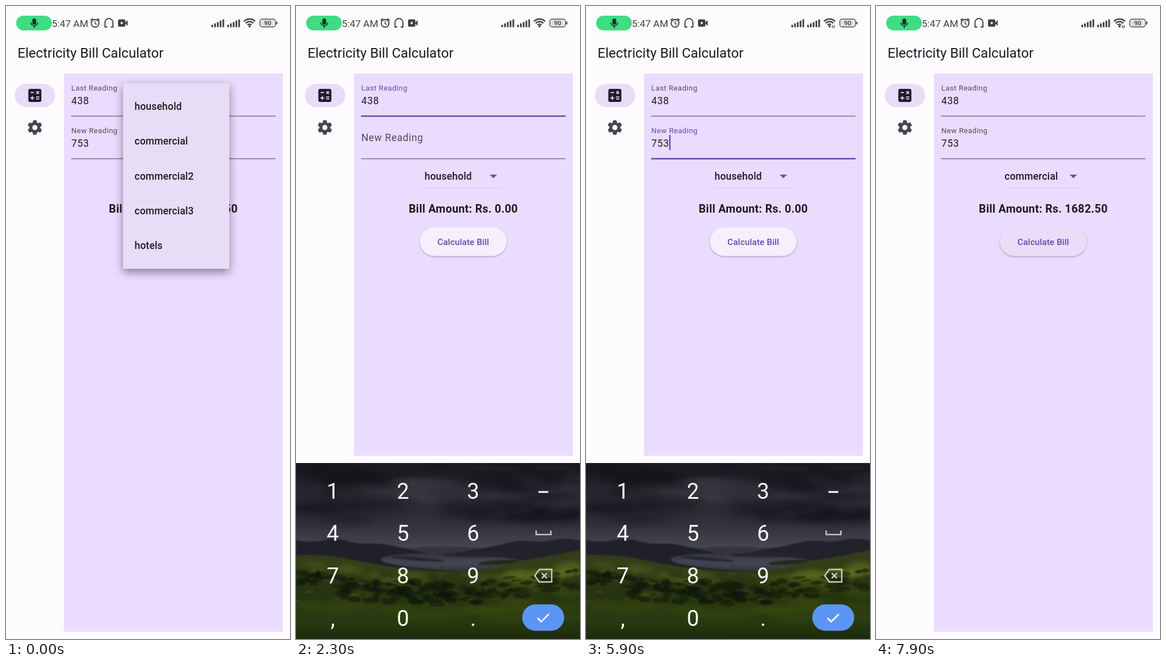
An HTML page with a canvas that plays this animation: 502x1115 px, repeating every 8000 ms.

```html
<!DOCTYPE html>
<html lang="en">
<head>
<meta charset="utf-8">
<title>Electricity Bill Calculator</title>
<style>
html, body { margin: 0; width: 100%; height: 100%; overflow: hidden; background: #fefbff; }
canvas { display: block; }
</style>
</head>
<body>
<canvas id="stage" width="502" height="1115"></canvas>
<script>
const LOOP = 8000, W = 502, H = 1115, KEYBOARD = 310;
const INK = '#1c1a20', SOFT = '#504a58', PRIMARY = '#6646ae', PANEL = '#eadcfe', STATUS = '#414144';
const c = document.getElementById('stage').getContext('2d');

const clamp = x => Math.max(0, Math.min(1, x));
const span = (t, from, to) => clamp((t - from) / (to - from));
const easeOut = p => 1 - (1 - p) ** 3;
const within = (t, from, to) => t >= from && t < to;

// Timeline
const FOCUS_LAST = 350, FOCUS_NEW = 3080, BLUR = 6150, PICKED = 6855, CALCULATED = 7480;
const presses = [['4', 1150], ['3', 1450], ['8', 1760], ['7', 3880], ['5', 4380], ['3', 4850]]
  .map(([key, release]) => ({ key, release }));
const taps = [[200, 166, 230, 370], [200, 232, 2960, 3100], [437, 1078, 6020, 6160],
  [290, 300, 6460, 6590], [246, 360, 6760, 6930], [296, 415, 7360, 7500]];
const ITEMS = ['household', 'commercial', 'commercial2', 'commercial3', 'hotels'];
const KEYS = ['123', '456', '789', ',0.'];
const keyX = col => 65 + col * 124, keyY = row => 49 + row * 74.7;

// Drawing helpers
function text(s, x, y, size, color = INK, { weight = 400, spacing = 0, align = 'left' } = {}) {
  c.font = `${weight} ${size}px Roboto, sans-serif`;
  c.letterSpacing = spacing + 'px';
  c.textAlign = align;
  c.fillStyle = color;
  c.fillText(s, x, y);
}
function box(x, y, w, h, r, color) {
  c.beginPath();
  c.roundRect(x, y, w, h, r);
  c.fillStyle = color;
  c.fill();
}
function disc(x, y, r, color) {
  c.beginPath();
  c.arc(x, y, r, 0, 7);
  c.fillStyle = color;
  c.fill();
}
function line(points, color, width, closed = false) {
  c.beginPath();
  points.forEach(([x, y]) => c.lineTo(x, y));
  if (closed) c.closePath();
  c.strokeStyle = color;
  c.lineWidth = width;
  c.stroke();
}
function arc(x, y, r, from, to, color, width) {
  c.beginPath();
  c.arc(x, y, r, from * Math.PI, to * Math.PI);
  c.strokeStyle = color;
  c.lineWidth = width;
  c.stroke();
}
function shadow(color, blur, dy) {
  c.shadowColor = color;
  c.shadowBlur = blur;
  c.shadowOffsetY = dy;
}

// Stormy landscape behind the keys, painted once
function paintLandscape() {
  const canvas = document.createElement('canvas');
  canvas.width = W;
  canvas.height = KEYBOARD;
  const g = canvas.getContext('2d');
  const gradient = (y0, y1, ...colors) => {
    const fill = g.createLinearGradient(0, y0, 0, y1);
    colors.forEach((color, i) => fill.addColorStop(i / (colors.length - 1), color));
    return fill;
  };
  let seed = 7;
  const random = () => (seed = seed * 16807 % 2147483647) / 2147483647;
  const oval = (x, y, w, h, color, tilt = 0) => {
    g.beginPath();
    g.ellipse(x, y, w, h, tilt, 0, 7);
    g.fillStyle = color;
    g.fill();
  };
  // Ground below a smooth skyline
  const land = (skyline, fill) => {
    g.beginPath();
    g.moveTo(skyline[0][0], KEYBOARD);
    g.lineTo(...skyline[0]);
    for (let i = 1; i < skyline.length - 1; i++) {
      const [x, y] = skyline[i], [nx, ny] = skyline[i + 1];
      g.quadraticCurveTo(x, y, (x + nx) / 2, (y + ny) / 2);
    }
    g.lineTo(...skyline.at(-1));
    g.lineTo(skyline.at(-1)[0], KEYBOARD);
    g.fillStyle = fill;
    g.fill();
  };
  // Irregular patches scattered in a band that may slope
  const scatter = (n, x0, x1, y0, y1, slope, w, h, color) => {
    for (let i = 0; i < n; i++) {
      const x = x0 + random() * (x1 - x0), y = y0 + random() * (y1 - y0) + (x - x0) * slope;
      oval(x, y, w * (.3 + random()), h * (.4 + random()), color, slope);
    }
  };

  g.fillStyle = gradient(0, 150, '#1d1d23', '#26252c', '#2b2a33', '#34323c', '#494752');
  g.fillRect(0, 0, W, KEYBOARD);
  g.filter = 'blur(10px)';
  oval(230, 50, 130, 14, 'rgba(82,79,88,.5)', .1);
  oval(90, 22, 110, 14, 'rgba(12,12,16,.6)', .1);
  oval(400, 20, 120, 12, 'rgba(14,14,18,.5)', -.1);
  oval(390, 84, 140, 17, 'rgba(18,18,24,.6)', .06);
  oval(90, 80, 110, 14, 'rgba(18,18,24,.5)', -.06);
  g.filter = 'blur(5px)';
  scatter(24, 0, W, 5, 100, 0, 50, 5, 'rgba(82,80,92,.2)');
  scatter(24, 0, W, 0, 105, 0, 55, 6, 'rgba(12,12,18,.28)');

  g.filter = 'blur(.8px)';
  land([[0, 150], [180, 152], [250, 146], [340, 151], [W, 145]], '#353541');
  land([[250, 166], [300, 155], [350, 147], [395, 135], [435, 140], [470, 132], [W, 136]], '#22222d');
  land([[0, 136], [25, 141], [70, 131], [110, 143], [150, 141], [200, 152], [250, 164]], '#20202b');
  oval(285, 175, 135, 15, gradient(160, 190, '#34353f', '#454653', '#33353d'), .04);
  oval(325, 162, 70, 3.5, '#24252d');
  oval(215, 169, 48, 3, '#25272d', .08);
  oval(360, 175, 38, 4, '#25281f', -.06);
  land([[0, 162], [50, 161], [115, 173], [170, 184], [240, 191], [310, 191], [355, 183],
    [410, 170], [455, 163], [W, 153]],
    gradient(155, KEYBOARD, '#343b1c', '#343f17', '#2a3613', '#25330f', '#2b3c10', '#26380f', '#1b2a0b'));
  g.filter = 'blur(4px)';
  scatter(16, 0, 210, 174, 193, .1, 30, 4, 'rgba(100,112,40,.38)');
  scatter(16, 320, W, 203, 222, -.16, 32, 5, 'rgba(104,118,38,.4)');
  scatter(14, 100, W, 200, 250, 0, 40, 5, 'rgba(84,102,28,.3)');
  scatter(12, 0, W, 248, 275, 0, 65, 6, 'rgba(66,88,20,.3)');
  g.filter = 'blur(1px)';
  scatter(75, 0, 310, 188, 215, .09, 12, 4, 'rgba(17,22,11,.55)');
  scatter(45, 70, 330, 216, 240, .05, 12, 4, 'rgba(15,21,9,.55)');
  scatter(45, 330, W, 205, 242, -.1, 11, 3.5, 'rgba(18,24,10,.55)');
  scatter(60, 0, W, 178, 245, 0, 7, 1.5, 'rgba(112,122,48,.22)');
  g.filter = 'none';
  return canvas;
}
const landscape = paintLandscape();

function statusBar(t) {
  box(18, 17, 63, 26, 13, '#3fdc84');
  box(46.5, 22, 7, 11, 3.5, '#173322');
  arc(50, 29, 6, 0, 1, '#173322', 1.6);
  line([[50, 35], [50, 38.5]], '#173322', 2);
  text('5:47 AM', 81, 37, 17.4, STATUS);

  arc(157.5, 30.5, 6.8, 0, 2, STATUS, 1.9);
  line([[157.5, 26.5], [157.5, 31], [160.5, 32.5]], STATUS, 1.5);
  line([[149.5, 25.5], [153.5, 22]], STATUS, 2);
  line([[161.5, 22], [165.5, 25.5]], STATUS, 2);
  arc(182, 29, 7, 1, 2, STATUS, 1.9);
  line([[175, 29], [175, 37], [179, 37]], STATUS, 1.9);
  line([[189, 29], [189, 37], [185, 37]], STATUS, 1.9);
  box(198, 23.5, 13, 13, 2.5, STATUS);
  c.beginPath();
  [[210, 30], [215, 25], [215, 35]].forEach(p => c.lineTo(...p));
  c.fill();
  disc(204.5, 30, 2, '#fefbff');

  for (const x of [363, 391])
    for (let i = 0; i < 5; i++) box(x + i * 4.9, 33 - i * 2.4, 3, 4.5 + i * 2.4, 1, STATUS);
  for (const r of [5, 9.5, 14]) arc(430.5, 37, r, 1.25, 1.75, STATUS, 2.5);
  disc(430.5, 35.8, 2, STATUS);
  if (t >= 2900) {
    box(433, 32, 9, 8, 0, '#fefbff');
    line([[435.5, 39], [435.5, 34]], STATUS, 1.4);
    line([[438.5, 34], [438.5, 39]], STATUS, 1.4);
  }
  c.beginPath();
  c.roundRect(448.7, 23.2, 27.5, 13.6, 4);
  c.strokeStyle = STATUS;
  c.lineWidth = 1.4;
  c.stroke();
  box(450.5, 25, 22, 10, 2.5, '#dedce0');
  box(477.5, 27.5, 2.2, 5, 1, STATUS);
  text('90', 462.5, 34, 11, STATUS, { weight: 500, align: 'center' });
}

function rail() {
  box(15.5, 137, 71.5, 41, 20.5, '#e7ddf6');
  box(39.5, 146, 23, 23, 3, '#1f192c');
  const mark = '#e7ddf6';
  line([[43.5, 152.5], [49.5, 152.5]], mark, 1.8);
  line([[53.7, 150.2], [58.3, 154.8]], mark, 1.7);
  line([[58.3, 150.2], [53.7, 154.8]], mark, 1.7);
  line([[43, 162], [50, 162]], mark, 1.8);
  line([[46.5, 158.5], [46.5, 165.5]], mark, 1.8);
  line([[53, 160.3], [59, 160.3]], mark, 1.7);
  line([[53, 163.7], [59, 163.7]], mark, 1.7);

  c.save();
  c.translate(51, 214);
  disc(0, 0, 9.6, '#49454e');
  for (let i = 0; i < 6; i++) {
    c.beginPath();
    [[-4, -8], [-2.9, -12.8], [2.9, -12.8], [4, -8]].forEach(p => c.lineTo(...p));
    c.fill();
    c.rotate(Math.PI / 3);
  }
  disc(0, 0, 4.5, '#fefbff');
  c.restore();
}

function field(label, y, value, focusedAt, blurredAt, t, filled) {
  const focused = within(t, focusedAt, blurredAt);
  const floating = filled ? 1 : span(t, focusedAt, focusedAt + 167);
  const size = 17.5 - 4.4 * floating;
  text(label, 115.5, y + 44 - 14.2 * floating, size, focused ? PRIMARY : SOFT, { spacing: size * .0366 });
  text(value, 115.5, y + 54, 17.5, INK, { spacing: .64 });
  line([[115, y + 75], [476.5, y + 75]], focused ? PRIMARY : '#7c7285', focused ? 2.6 : 1.3);
  const typed = presses.filter(p => p.release <= t && p.release > focusedAt).at(-1);
  const since = t - (typed ? typed.release : focusedAt);
  if (focused && since % 1000 < 500) box(115.5 + value.length * 10.5, y + 33, 2.5, 27, 1, PRIMARY);
}

function form(t, bottom) {
  const before = t < 100;
  const typed = (from, to) => presses.filter(p => within(p.release, from, to) && p.release <= t).map(p => p.key).join('');
  box(102.3, 119, 387.2, bottom - 119, 0, PANEL);
  field('Last Reading', 119, before ? '438' : typed(0, 3000), FOCUS_LAST, FOCUS_NEW, t, before || t >= FOCUS_NEW);
  field('New Reading', 194, before ? '753' : typed(3000, LOOP), FOCUS_NEW, BLUR, t, before || t >= BLUR);

  const choice = before ? 'commercial2' : t < PICKED ? 'household' : 'commercial';
  text(choice, 227.3, 306, 17.5, INK, { weight: 500, spacing: .19 });
  line([[227, 320], [364, 320]], '#d6cae6', 1.2);
  c.beginPath();
  [[342.4, 297], [355.4, 297], [348.9, 303.6]].forEach(p => c.lineTo(...p));
  c.fillStyle = '#675e72';
  c.fill();

  const done = before || t >= CALCULATED;
  text(`Bill Amount: Rs. ${done ? '1682.50' : '0.00'}`, 295.7, 364, 19.7, INK, { weight: 700, spacing: .32, align: 'center' });

  c.save();
  shadow('rgba(40,20,70,.35)', 2.5, 1.2);
  box(219, 389.5, 153.5, 51, 25.5, before || t >= 7400 ? '#e9ddf7' : '#f6effc');
  c.restore();
  text('Calculate Bill', 295.7, 420.5, 15.3, PRIMARY, { weight: 500, spacing: .13, align: 'center' });
}

// v runs 0..1 while opening: panel fades, grows, then the items fade in one by one
function menu(y, v, closing) {
  const alpha = closing ? span(v, .75, 1) : span(v, 0, .25);
  if (!alpha) return;
  const x = 207, w = 187.5, h = closing ? 327 : 82 + 245 * span(v, .25, .5);
  c.save();
  c.globalAlpha = alpha;
  c.save();
  c.beginPath();
  c.rect(0, 0, W, H);
  c.rect(x, y, w, h);
  c.clip('evenodd');
  shadow('rgba(40,25,60,.5)', 16, 6);
  box(x, y, w, h, 2.5, '#e7ddf6');
  c.restore();
  box(x, y, w, h, 2.5, '#e7ddf6');
  c.beginPath();
  c.rect(x, y, w, h);
  c.clip();
  ITEMS.forEach((item, i) => {
    const unit = .5 / 6.5, start = .5 + (i + 1) * unit;
    c.globalAlpha = alpha * (i ? span(v, start, start + 1.5 * unit) : 1);
    text(item, 227.3, y + 47 + i * 61.35, 17.5, INK, { weight: 500, spacing: .19 });
  });
  c.restore();
}

function keyboard(t, top) {
  if (top >= H) return;
  c.save();
  c.translate(0, top);
  c.drawImage(landscape, 0, 0);
  const held = presses.find(p => within(t, p.release - 130, p.release + 30));
  KEYS.forEach((row, r) => [...row].forEach((key, col) => {
    const x = keyX(col), y = keyY(r), pressed = held && held.key === key;
    if (pressed) box(x - 62, y - 38, 124, 75, 0, 'rgba(225,227,224,.78)');
    text(key, x, y + 13.5, 38.5, '#fff', { align: 'center' });
    if (pressed) touch(x + 1, y);
  }));
  line([[428.5, 51], [446, 51]], '#fff', 3);
  line([[424.5, 119], [424.5, 126], [450.5, 126], [450.5, 119]], '#c3c3c6', 2.6);
  line([[422, 198.5], [430, 187.5], [452, 187.5], [452, 209.5], [430, 209.5]], '#c9cbc4', 2.5, true);
  line([[434.5, 194], [443.5, 203]], '#c9cbc4', 2.5);
  line([[443.5, 194], [434.5, 203]], '#c9cbc4', 2.5);
  box(400, 249, 74, 46.5, 23.25, '#5c95f5');
  line([[427, 273], [433.5, 279.5], [447, 266]], '#fff', 2.7);
  c.restore();
}

function touch(x, y) {
  disc(x, y, 14.5, 'rgba(245,245,245,.65)');
  arc(x, y, 14.5, 0, 2, 'rgba(110,110,115,.6)', 1.3);
}

function draw(t) {
  const up = easeOut(span(t, FOCUS_LAST, 754)) * (1 - span(t, 6200, 6450) ** 2);
  const top = Math.round(H - KEYBOARD * up);
  c.fillStyle = '#fefbff';
  c.fillRect(0, 0, W, H);
  statusBar(t);
  text('Electricity Bill Calculator', 20.5, 91.3, 24.07, INK);
  rail();
  form(t, top - 12.7);
  if (t < 100) menu(136, 1, false);
  else if (within(t, 6550, PICKED)) menu(259, span(t, 6550, 6850), false);
  else if (t >= PICKED) menu(259, 1 - span(t, PICKED, PICKED + 300), true);
  keyboard(t, top);
  for (const [x, y, from, to] of taps) if (within(t, from, to)) touch(x, y);
}

const began = performance.now();
function tick() {
  draw((performance.now() - began) % LOOP);
  requestAnimationFrame(tick);
}
tick();
</script>
</body>
</html>
```
